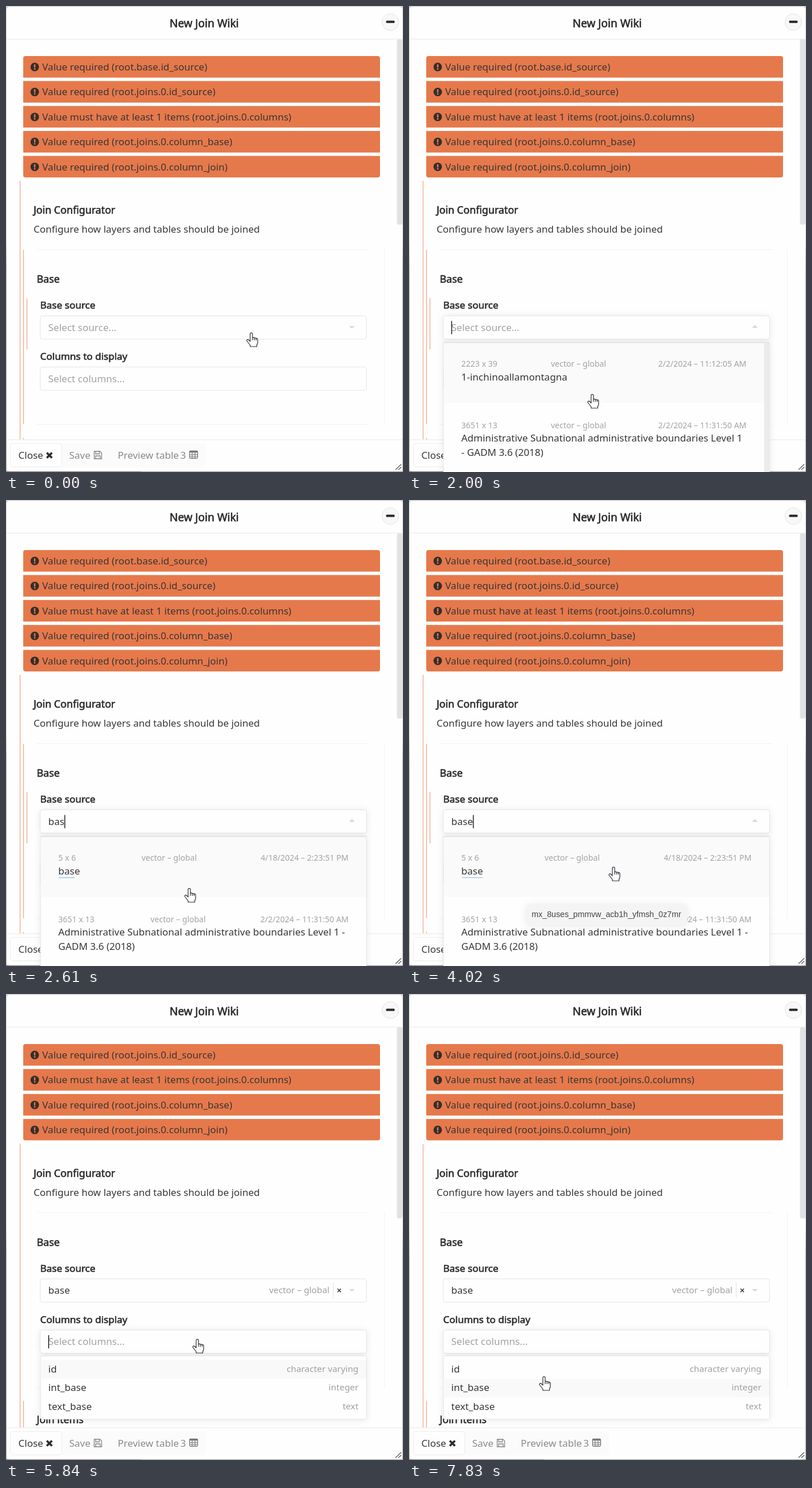
These frames come from a looping animation (691 by 810 pixels, 8 s). An HTML page:

```html
<!DOCTYPE html>
<html lang="en">
<head>
<meta charset="utf-8">
<title>Join configurator</title>
<style>
  html, body { margin: 0; width: 100%; height: 100%; overflow: hidden; background: #fefefe; }
  svg { display: block; width: 691px; height: 810px; }
  text { font: 17px "Noto Sans", sans-serif; fill: #363636; white-space: pre; }
  .head { stroke: #2c2c2c; stroke-width: .65px; fill: #2c2c2c; }
  .title { font-size: 19px; text-anchor: middle; }
  .sub { font-size: 17.7px; }
  .hint { fill: #a2a2a2; }
  .mute { fill: #8a8a8a; }
  .meta { font-size: 14px; fill: #a3a3a3; }
  .type { font-size: 15.3px; fill: #a0a0a0; }
  .end { text-anchor: end; }
  .tip { font: 14.15px "Liberation Sans", Arial, sans-serif; fill: #444; }
  .box { fill: #fefefe; stroke: #e4e4e4; }
  .rule { fill: none; stroke: #f1f1f1; }
  .mark { fill: none; stroke: #f2a283; stroke-width: 1.2px; }
  .glow { filter: drop-shadow(0 1px 6px #00000016); }
  .tri { fill: #d6d6d6; }
</style>
</head>
<body>
<svg id="stage" viewBox="0 0 691 810"></svg>
<script>
const LOOP = 8000;
const STEP = 43.4;
const ticks = [0, 200, 400, 590, 1010, 1200, 1400, 1600, 2000, 2410, 2610, 2990, 3420, 3620, 4020,
  4620, 4800, 5000, 5200, 5420, 5840, 6040, 6240, 6440, 6640, 6840, 7040, 7220, 7630, 7830];

// time, x, y of the pointer's hot spot
const path = [
  [0, 428, 568], [590, 428, 568], [1600, 320, 675], [2990, 320, 675], [3420, 357, 638],
  [4800, 357, 638], [5420, 334, 600], [5840, 334, 600], [6440, 302, 649], [6840, 300, 652],
  [7220, 262, 706], [7630, 250, 700], [7830, 236, 665], [LOOP, 236, 665]
];
const typed = [[0, ''], [2410, 'ba'], [2610, 'bas'], [2990, 'base']];
const widths = { '': 0, ba: 20, bas: 28.1, base: 37.7 };
const caretOn = [[200, 590], [1010, 1600], [2000, 3420], [4020, 4620], [5840, 6240], [6840, 7040], [7220, 7630]];

const errors = ['required (root.base.id_source)', 'required (root.joins.0.id_source)',
  'must have at least 1 items (root.joins.0.columns)',
  'required (root.joins.0.column_base)', 'required (root.joins.0.column_join)'];

const text = (x, y, s, cls = '') => `<text x="${x}" y="${y}" class="${cls}">${s}</text>`;
const rect = (x, y, w, h, attrs = '') => `<rect x="${x}" y="${y}" width="${w}" height="${h}" ${attrs}/>`;
const line = (d, attrs) => `<path d="${d}" ${attrs}/>`;
const move = (x, y, s) => `<g transform="translate(${x} ${y})">${s}</g>`;
const lastOf = (table, t) => table.filter(row => row[0] <= t).pop();

function pointer(t) {
  const i = Math.max(1, path.findIndex(p => p[0] > t));
  const [a, ax, ay] = path[i - 1], [b, bx, by] = path[i];
  const k = (t - a) / (b - a);
  return [ax + (bx - ax) * k, ay + (by - ay) * k];
}

function frame() {
  return `<defs><linearGradient id="edge" x2="0" y2="1"><stop offset=".5" stop-color="#d2d2d2"/>
    <stop offset=".56" stop-color="#a6a6a6"/></linearGradient></defs>`
    + rect(0, 0, 691, 810, 'fill="url(#edge)"')
    + rect(0, 807, 235, 3, 'fill="#858585"')
    + rect(1, 1.5, 689, 807, 'rx="5" fill="#fefefe"');
}

function header(thumb) {
  return text(345, 36.8, 'New Join Wiki', 'head title')
    + line('M1 57.5H690', 'stroke="#e9e9e9"')
    + '<circle cx="669" cy="28" r="14.5" fill="#f8f8f8" stroke="#e3e3e3"/>'
    + rect(661.5, 25.5, 15, 4, 'rx="1.5" fill="#262626"')
    + rect(680.5, 58, 9.5, thumb, 'rx="3" fill="#e2e2e2"');
}

function alerts(list) {
  const rows = list.map((s, i) => move(0, i * STEP,
    rect(30, 87, 621, 37.5, 'fill="#e6794b"')
    + '<circle cx="50" cy="106" r="7.4" fill="#332e2c"/>'
    + rect(48.8, 101.3, 2.4, 5.8, 'rx=".6" fill="#e6794b"')
    + '<circle cx="50" cy="109.4" r="1.4" fill="#e6794b"/>'
    + text(63, 112, 'Value ' + s)));
  return `<clipPath id="round">${rect(30, 87, 621, STEP * list.length - 6, 'rx="4"')}</clipPath>`
    + `<g clip-path="url(#round)">${rows.join('')}</g>`;
}

function field(y, focus, arrow) {
  const tri = { down: `M597 ${y + 18}h10l-5 4z`, up: `M597 ${y + 21}h10l-5 -5z` }[arrow];
  return rect(59.5, y, 568, 40.5, `rx="4" class="box ${focus ? 'glow' : ''}"`)
    + (tri ? line(tri, 'class="tri"') : '');
}

function form(t, picked, word) {
  const open = t >= 200 && !picked;
  let s = line('M24.5 304V800', 'class="mark"')
    + line(picked ? 'M30.5 750.5V810' : 'M30.5 424V727M30.5 750.5V810M36.5 508V597', 'class="mark"')
    + line('M54 423.5H632M54 727.5H632M658.5 423V727', 'class="rule"')
    + text(48, 361, 'Join Configurator', 'head sub')
    + text(48, 394, 'Configure how layers and tables should be joined')
    + text(53.5, 481.3, 'Base', 'head sub')
    + text(59.5, 526, 'Base source', 'head')
    + field(538.5, open, open ? 'up' : 'down');
  if (picked) {
    s += text(73.5, 564.7, 'base') + text(458, 563.3, 'vector – global', 'type')
      + line('M569.5 545V572', 'stroke="#e4e4e4"')
      + line('M577 555.6l6 6m0 -6l-6 6', 'stroke="#333" stroke-width="1.5"');
  } else s += word ? text(73.5, 564.7, word) : text(73.5, 564.7, 'Select source...', 'hint');
  return s + text(59.5, 615, 'Columns to display', 'head')
    + field(627.5, t >= 5840)
    + text(73.5, 653.7, 'Select columns...', 'hint')
    + text(53.5, 789.6, 'Join items', 'head sub');
}

function footer() {
  return rect(1, 753.5, 689, 55, 'fill="#fefefe"')
    + line('M1 754H690', 'stroke="#e9e9e9"')
    + rect(7, 760, 341, 41.5, 'rx="5" fill="#fbfbfb"')
    + rect(7.5, 760.5, 89.5, 40.5, 'rx="5" fill="#fefefe" stroke="#ececec"')
    + text(21.5, 787, 'Close')
    + line('M71 776.5l9 9m0 -9l-9 9', 'stroke="#2c2c2c" stroke-width="3.6"')
    + text(110, 787, 'Save', 'mute')
    + line('M153.5 774h10l3 3v10h-13zM156 774v4.5h6.5v-4.5M156 787v-5h8v5', 'fill="none" stroke="#858585" stroke-width="1.3"')
    + text(194.5, 787, 'Preview table', 'mute') + text(303.5, 787, '3', 'mute')
    + rect(319.5, 773.5, 14, 12.5, 'rx="1.5" fill="none" stroke="#777" stroke-width="1.3"')
    + line('M319.5 775H333.5', 'stroke="#777" stroke-width="2.5"')
    + line('M319.5 779.5h14m-14 3.3h14M324 776v10m5 -10v10', 'stroke="#777" stroke-width="1.1"')
    + line('M678 806l10 -9.5M683 806l5 -4.5', 'stroke="#555" stroke-width="1.2"');
}

function sources(word) {
  const row = (y, size, x, date) => text(91, y, size, 'meta')
    + text(x, y, 'vector – global', 'meta') + text(word ? 596.3 : 587.3, y, date, 'meta end');
  let s = rect(60, 584.5, 567.5, 240, 'class="box glow"')
    + rect(60.5, 586, 566.5, 104, 'fill="#fafafa"')
    + line('M60 585H627.5', 'stroke="#e0e0e0" stroke-width="1.5"');
  if (word) {
    s += row(627, '5 x 6', 236, '4/18/2024 – 2:23:51 PM') + text(91, 651, 'base')
      + line(`M92 656.5H${91 + widths[word]}`, 'stroke="#74c3ea" stroke-width="1.2"');
  } else {
    s += rect(618, 586, 9.5, 224, 'fill="#ebebeb"')
      + row(627, '2223 x 39', 247, '2/2/2024 – 11:12:05 AM') + text(91, 651, '1-inchinoallamontagna');
  }
  return s + row(734, '3651 x 13', word ? 251.5 : 247, '2/2/2024 – 11:31:50 AM')
    + text(91, 757, 'Administrative Subnational administrative boundaries Level 1' + (word ? ' -' : ''))
    + text(91, 782, (word ? '' : '- ') + 'GADM 3.6 (2018)');
}

function columns(y) {
  const active = y > 701 ? 2 : y > 664 ? 1 : 0;
  const rows = [['id', 'character varying'], ['int_base', 'integer'], ['text_base', 'text']];
  return rect(60, 629, 567.5, 110, 'rx="3" class="box glow"')
    + rect(60.5, 636 + active * 32.6, 566.5, 32.6, 'fill="#f9f9f9"')
    + rows.map(([name, type], i) => text(73.5, 657.8 + i * 32.5, name)
      + text(613.5, 657 + i * 32.3, type, 'type end')).join('');
}

function tooltip() {
  return rect(204, 703, 280, 36, 'rx="6" fill="#f4f4f4" class="glow"')
    + text(213.5, 725, 'mx_8uses_pmmvw_acb1h_yfmsh_0z7mr', 'tip');
}

function cursor(x, y, hand) {
  const shape = hand
    ? 'M-3 2C-3 -.6 1 -.6 1 2V9C1.5 7.8 4 7.8 4.3 9.5 5 8.3 7 8.6 7.3 10.2 8.2 9.2 10 9.8 10 11.5V17C10 19 9 20 8.5 21.5V24H-3V21.5C-5 19 -7 16.5 -8.5 14.5-10 12.3 -7 10.8 -5.5 12.5L-3 15ZM1 9v4M4.3 9.5v3.5M7.3 10.2v3'
    : 'M0 0V18L4 14.2 7 20.5 9.5 19.3 6.8 13.3H12.5Z';
  return move(x, y, line(shape, 'fill="#fff" stroke="#2a2a33" stroke-width="1.2" stroke-linejoin="round"'));
}

function scene(t) {
  const picked = t >= 4620;
  const word = lastOf(typed, t)[1];
  const [x, y] = pointer(t);
  let s = frame() + alerts(picked ? errors.slice(1) : errors)
    + move(0, picked ? -STEP : 0, form(t, picked, word))
    + footer() + header(picked ? 332 : 322);
  if (t >= 200 && !picked) s += sources(word);
  if (t >= 3620 && !picked) s += tooltip();
  if (t >= 5840) s += columns(y);
  if (caretOn.some(([a, b]) => t >= a && t < b)) {
    const cx = 74.3 + (picked ? 0 : widths[word]);
    s += rect(cx - .7, picked ? 593 : 547.5, 1.4, 23, 'fill="#111"');
  }
  const hand = !picked || t >= 5840 || y < 624;
  return s + cursor(x, y, hand);
}

const stage = document.getElementById('stage');
const start = performance.now();
let shown = -1;

function play() {
  const now = (performance.now() - start) % LOOP;
  const t = ticks.filter(v => v <= now).pop();
  if (t !== shown) {
    stage.innerHTML = scene(t);
    shown = t;
  }
  requestAnimationFrame(play);
}
play();
</script>
</body>
</html>
```
